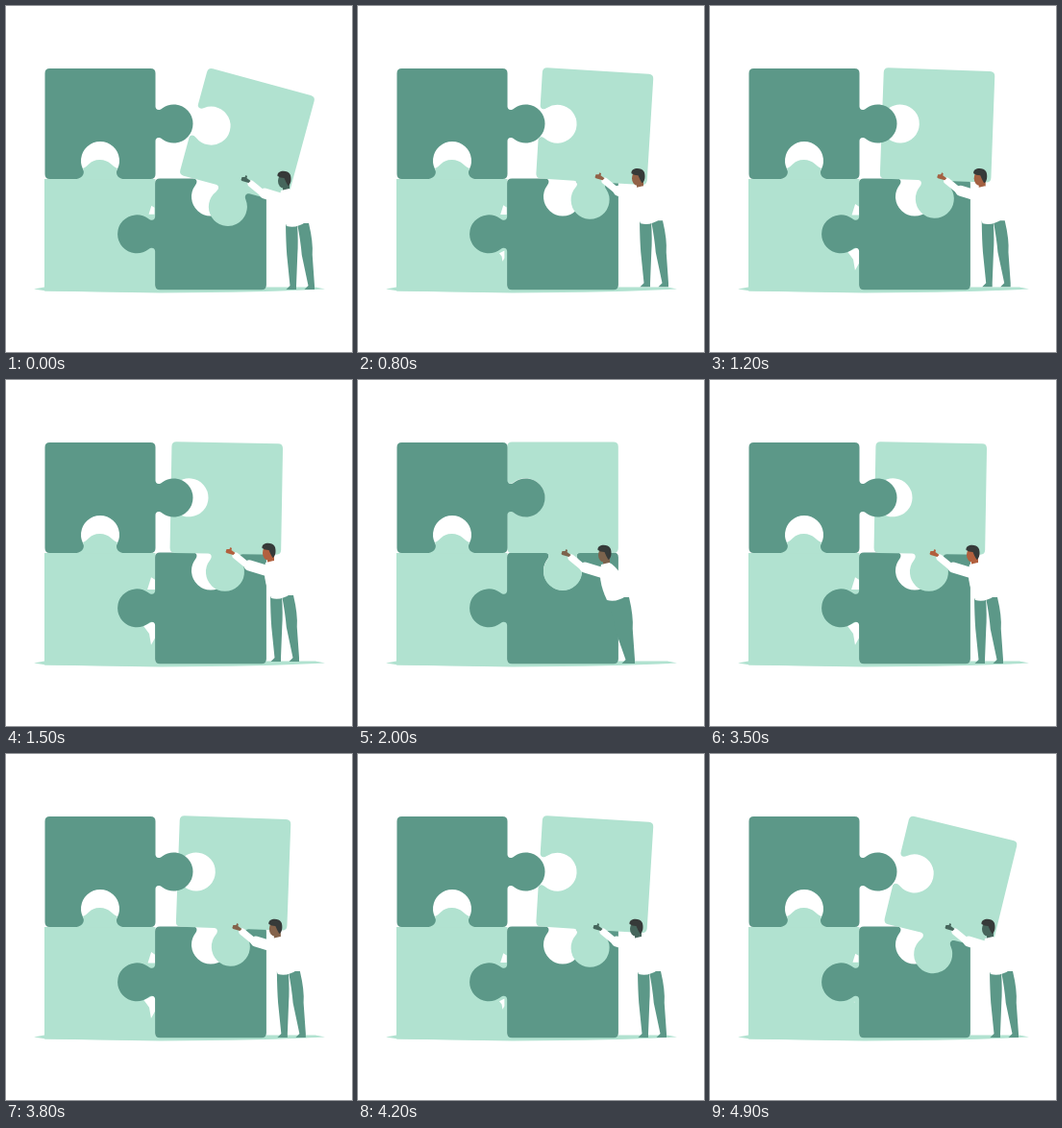
Write an HTML page that moves like this. It is 360 px wide and 360 px high and loops after 5000 ms.

```html
<!DOCTYPE html>
<html lang="en">
<head>
<meta charset="utf-8">
<title>Puzzle</title>
<style>
html, body { margin: 0; width: 100%; height: 100%; overflow: hidden; background: #fff; }
svg { display: block; width: 100vw; height: 100vh; }
.dark { fill: #5c9888; }
.light { fill: #b1e2d0; }
.white { fill: #fff; }
.skin { fill: currentColor; }
.sleeve { fill: none; stroke: #fff; stroke-linecap: round; stroke-linejoin: round; }
</style>
</head>
<body>
<svg viewBox="0 0 360 360">
  <path class="light" d="M29 294.5L40 292.5H322L332 294.5Q270 298 160 298.5L42 296.5Z"/>
  <path class="light" d="M40 180H155.5V298L40 296.5Z"/>
  <path id="gapTop" class="white" d="M151 205L155.5 208V218L147 218Z"/>
  <path id="gapLow" class="white" d="M143 256L155.5 250V268L151 276L149 264Z"/>
  <path id="lowRight" class="dark"/>
  <path id="mover" class="light"/>
  <path id="topLeft" class="dark"/>
  <path class="light" d="M70 180.5C78 180 83 176 80 169C86 167 87 160 97.5 160S110 167 116 169C113 176 117 180 125 180.5Z"/>
  <!-- the man's origin is his hip -->
  <g id="man">
    <path id="legs" class="dark"/>
    <path class="skin" d="M-14-41L-7-42V-33H-14Z"/>
    <path class="white" d="M-16-34Q-20-18-10 3Q0 6 11-2C10-20 0-32-7.5-36Z"/>
    <path class="sleeve" stroke-width="11" d="M-33-31L-10-24"/>
    <path class="sleeve" stroke-width="7" d="M-47-41L-36-32L-10-24"/>
    <path class="skin" transform="translate(-53.5 -46)" d="M-4 1L-3-2L0-2L1-4L2.5-3L2-1L6 2L4 4L-3 2Z"/>
    <g transform="translate(-12.5 -45)">
      <ellipse class="skin" cx="-1" cy="1" rx="5.5" ry="7.5"/>
      <path fill="#363a39" d="M-7-4C-8-10 3-11 6-6C8-2 7 5 4 6C2 3 1 0 0-2C-3-2-5-3-7-4Z"/>
    </g>
  </g>
</svg>
<script>
const LOOP = 5000, STEP = 100, CLOSED = 213;
const COOL = [70, 102, 92], WARM = [178, 96, 62];
const el = {};
document.querySelectorAll('[id]').forEach(e => el[e.id] = e);
const set = (id, name, value) => el[id].setAttribute(name, value);
const mix = (a, b, f) => a.map((v, i) => v + (b[i] - v) * f);
const clamp = v => Math.max(0, Math.min(1, v));

// time, x, angle of the loose piece as it closes; it opens in reverse
const slide = [[0, 251, 15.2], [800, 246.3, 3.5], [1500, 229.3, 1], [2000, CLOSED, 0]];
// time, hip x, warmth of the skin
const walk = [[300, 302, 0], [800, 304, .7], [1500, 286, 1], [2000, 269, .5],
  [3000, 269, .5], [3500, 286, 1], [4200, 302, 0]];

function at(keys, t) {
  let i = 0;
  while (i < keys.length - 2 && t >= keys[i + 1][0]) i++;
  const a = keys[i], b = keys[i + 1];
  return mix(a, b, clamp((t - a[0]) / (b[0] - a[0])));
}

// Outline of a square piece; tabs run top, right, bottom, left: 1 knob, -1 notch, 0 flat.
function piece(cx, cy, h, tabs) {
  const r = 5;
  const sides = tabs.map((k, i) => {
    const c = Math.cos(i * Math.PI / 2), s = Math.sin(i * Math.PI / 2);
    // u runs along the side, v points away from the piece
    const p = (u, v) => `${(cx + u * c + (h + v) * s).toFixed(2)} ${(cy + u * s - (h + v) * c).toFixed(2)} `;
    const tab = k && 'L' + p(-18, 0) + 'C' + p(-15, 0) + p(-13, 3 * k) + p(-16, 7 * k)
      + `A20 20 0 1 ${k > 0 ? 1 : 0} ` + p(16, 7 * k)
      + 'C' + p(13, 3 * k) + p(15, 0) + p(18, 0);
    return p(r - h, 0) + (tab || '') + 'L' + p(h - r, 0) + 'Q' + p(h, 0) + p(h, -r);
  });
  return 'M' + sides.join('L') + 'Z';
}

function leg(x, foot) {
  const knee = (x + foot) / 2;
  return `M${x - 6} 0H${x + 6}Q${knee + 6.5} 20 ${knee + 5.5} 33L${foot + 3.5} 65V69H${foot - 7}L${foot - 3} 65`
    + `L${knee - 5.5} 33Q${knee - 6.5} 20 ${x - 6} 0Z`;
}

const shrink = (id, x, y, s) =>
  set(id, 'transform', `translate(${x} ${y}) scale(${s}) translate(${-x} ${-y})`);

function drawPiece(t) {
  const [, x, angle] = at(slide, Math.min(t, LOOP - t));
  const open = (x - CLOSED) / 38;
  set('mover', 'transform', `translate(${x} ${122.2 + angle * .83}) rotate(${angle})`);
  shrink('gapTop', 152, 214, clamp(open * 2.4) * (1.2 - open * .5));
  shrink('gapLow', 150, 258, 4 * open * (1 - open));
}

function drawMan(t) {
  const [, x, warmth] = at(walk, t);
  const lift = 3 * Math.sin(Math.PI * clamp(t / 2000));
  const stride = 3 + 16 * clamp((x - 269) / 17);
  set('man', 'transform', `translate(${x} ${226 - lift})`);
  set('man', 'color', `rgb(${mix(COOL, WARM, warmth).map(Math.round)})`);
  set('legs', 'd', leg(-5, 15.5 - stride) + leg(7, 15.5));
}

set('topLeft', 'd', piece(98, 122.5, 57.5, [0, 1, -1, 0]));
set('lowRight', 'd', piece(213, 237.3, 57.9, [-1, 0, 0, 1]));
set('mover', 'd', piece(0, 0, 57.8, [0, 0, 1, -1]));

function tick() {
  const t = Math.floor(performance.now() % LOOP / STEP) * STEP;
  drawPiece(t);
  drawMan(t);
  requestAnimationFrame(tick);
}
tick();
</script>
</body>
</html>
```
